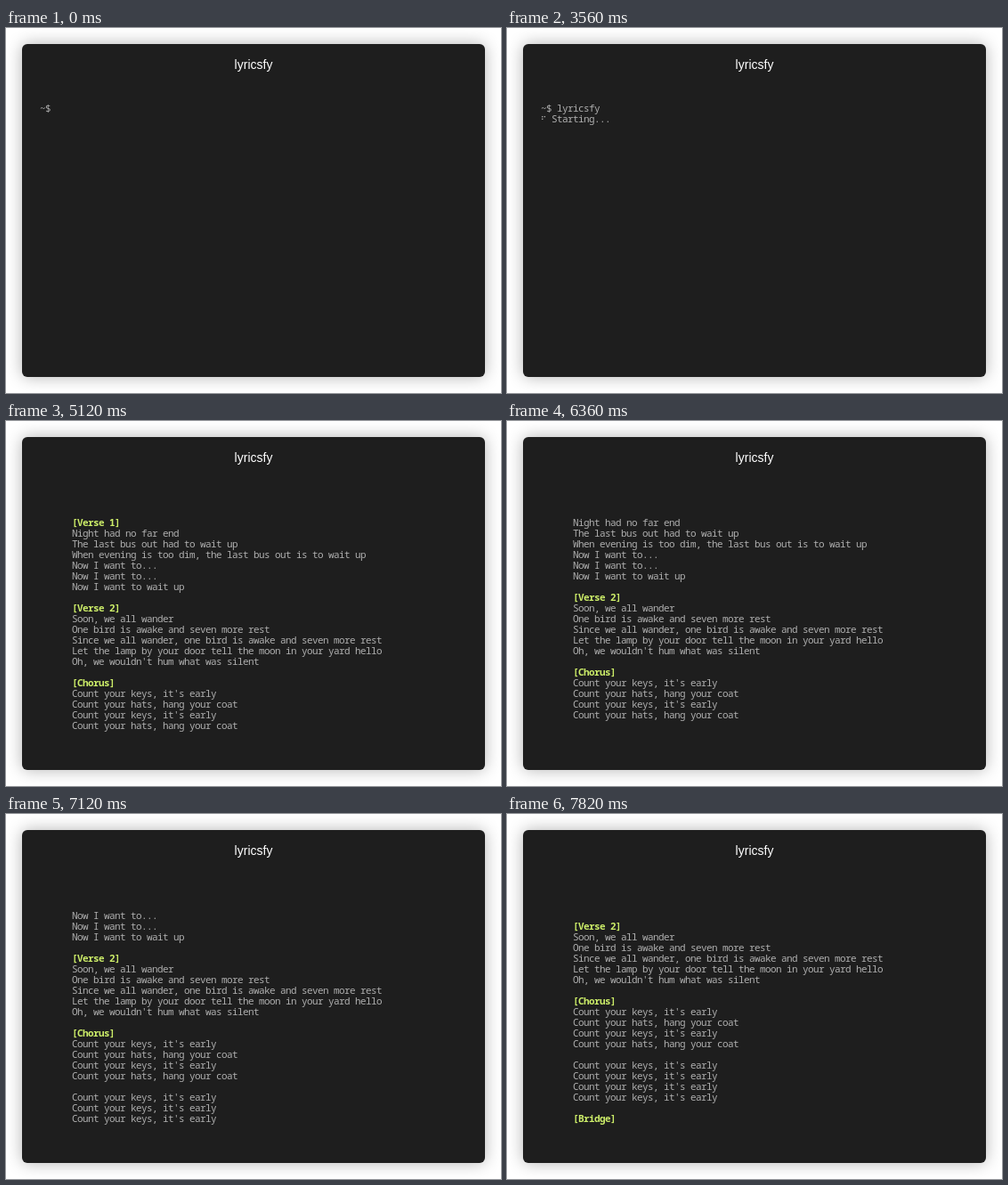
Write an HTML page with a canvas that moves like this. It is 556 by 410 pixels and loops after 8000 ms.

```html
<!DOCTYPE html>
<html lang="en">
<head>
<meta charset="utf-8">
<title>lyricsfy</title>
<style>
  html, body { margin: 0; width: 100%; height: 100%; overflow: hidden; background: #fff; }
  canvas { display: block; }
</style>
</head>
<body>
<canvas id="stage" width="556" height="410"></canvas>
<script>
const ctx = document.getElementById('stage').getContext('2d');
const LOOP = 8000, CELL = 6, ROW = 12, LEFT = 38, BASE = 94;
const GREY = '#afafaf', LIME = '#cdee69';

const COMMAND = 'lyricsfy';
const KEY_TIMES = [980, 1200, 1340, 1510, 1710, 1820, 2010, 2160];
const SCROLL_TIMES = [6360, 6660, 6870, 7120, 7360, 7570, 7820];
const SPINNER = [...'⠋⠙⠹⠸⠼⠴⠦⠧⠇⠏'];
const TASKS = [
  [3560, 'Starting...'],
  [3820, 'Searching...'],
  [4060, 'Loading...'],
  [4380, 'Formatting...']
];
const CLEAR = 5100, SHOW = 5120, VISIBLE = 20;

const LYRICS = `[Verse 1]
Night had no far end
The last bus out had to wait up
When evening is too dim, the last bus out is to wait up
Now I want to...
Now I want to...
Now I want to wait up

[Verse 2]
Soon, we all wander
One bird is awake and seven more rest
Since we all wander, one bird is awake and seven more rest
Let the lamp by your door tell the moon in your yard hello
Oh, we wouldn't hum what was silent

[Chorus]
Count your keys, it's early
Count your hats, hang your coat
Count your keys, it's early
Count your hats, hang your coat

Count your keys, it's early
Count your keys, it's early
Count your keys, it's early
Count your keys, it's early

[Bridge]`.split('\n');

const passed = (times, t) => times.filter(time => t >= time).length;

// Write text on the terminal grid.
function put(text, col, row, bold) {
  ctx.font = `${bold ? 'bold ' : ''}11px "Noto Sans Mono", monospace`;
  ctx.letterSpacing = '-0.6px';
  ctx.fillStyle = bold ? LIME : GREY;
  ctx.fillText(text, LEFT + col * CELL, BASE + row * ROW);
}

function putSymbol(symbol, row) {
  ctx.font = '9px "DejaVu Sans", sans-serif';
  ctx.letterSpacing = '0px';
  ctx.fillStyle = GREY;
  ctx.fillText(symbol, LEFT, BASE + row * ROW);
}

function drawWindow() {
  ctx.fillStyle = '#fff';
  ctx.fillRect(0, 0, 556, 410);
  ctx.save();
  ctx.shadowColor = 'rgba(0, 0, 0, .3)';
  ctx.shadowBlur = 18;
  ctx.fillStyle = '#1e1e1e';
  ctx.beginPath();
  ctx.roundRect(18, 18, 520, 374, 6);
  ctx.fill();
  ctx.restore();
  ctx.font = '14px "Liberation Sans", Arial, sans-serif';
  ctx.letterSpacing = '0px';
  ctx.fillStyle = '#fff';
  ctx.textAlign = 'center';
  ctx.fillText('lyricsfy', 278, 46);
  ctx.textAlign = 'left';
}

function drawShell(t) {
  put('~$ ' + COMMAND.slice(0, passed(KEY_TIMES, t)), 0, 0);
  const started = passed(TASKS.map(task => task[0]), t);
  const step = Math.min(17, Math.floor((t - 3560) / 81.2));
  TASKS.slice(0, started).forEach(([, label], i) => {
    putSymbol(i === started - 1 ? SPINNER[step % SPINNER.length] : '✔', i + 1);
    put(label, 2, i + 1);
  });
}

function drawLyrics(t) {
  const top = passed(SCROLL_TIMES, t);
  LYRICS.slice(top, top + VISIBLE).forEach((line, i) => put(line, 6, i + 2, line[0] === '['));
}

function draw() {
  const t = performance.now() % LOOP;
  drawWindow();
  if (t < CLEAR) drawShell(t);
  else if (t >= SHOW) drawLyrics(t);
  requestAnimationFrame(draw);
}
draw();
</script>
</body>
</html>
```
